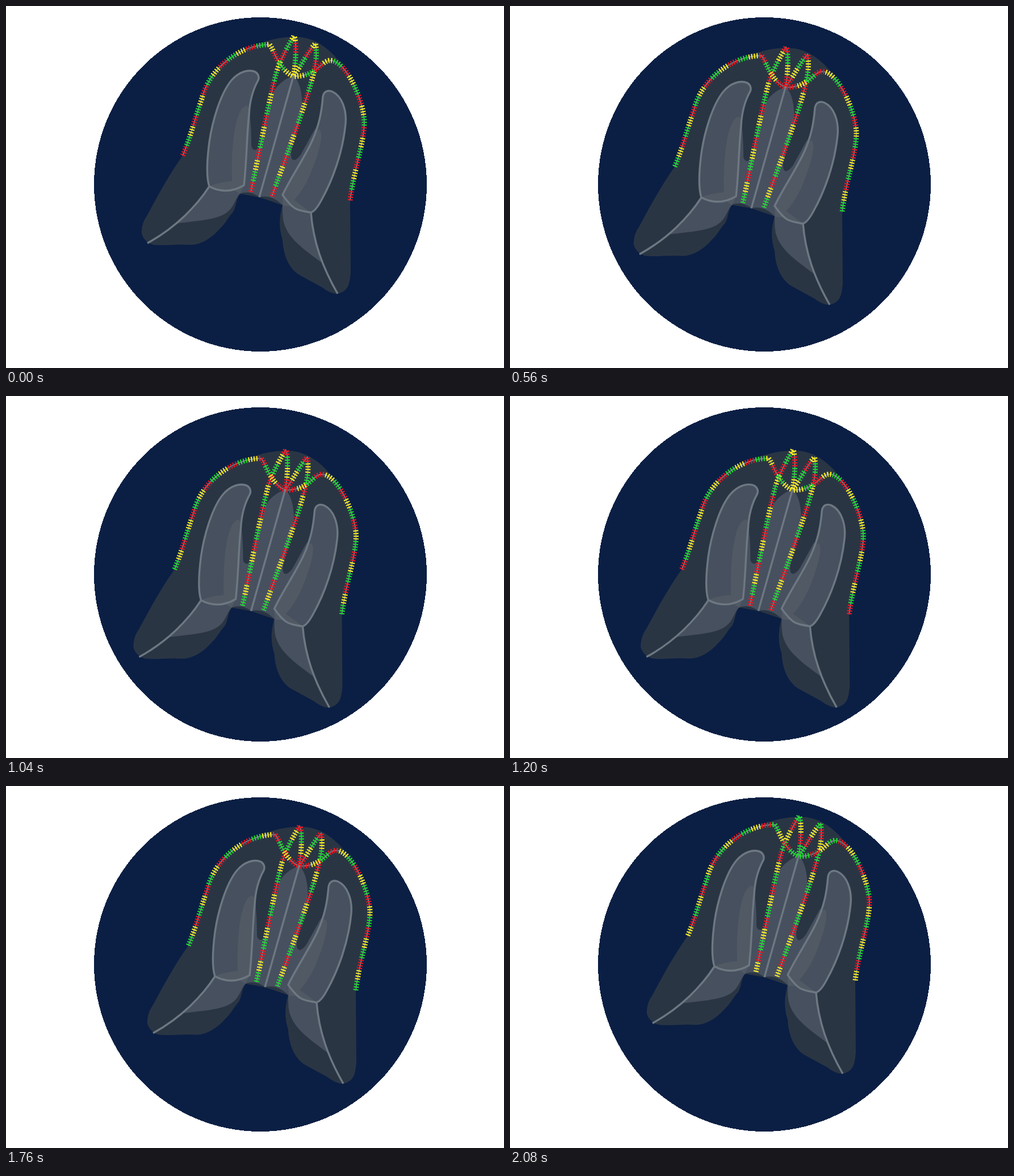
Recreate the animation shown at these times as an HTML page. Size 877 by 638 pixels, loop 2160 ms.

```html
<!DOCTYPE html>
<html lang="en">
<head>
<meta charset="utf-8">
<title>Stitched body</title>
<style>
  html, body { margin: 0; width: 100%; height: 100%; overflow: hidden; background: #fff; }
  svg { display: block; }
  .dark { fill: #2a3544; }
  .light { fill: #47505f; }
  .glow { fill: #515a64; }
  .edge { fill: none; stroke: #6d7882; stroke-width: 3.4; stroke-linejoin: round; }
  .core { fill: none; stroke: #77828a; stroke-width: 2; }
  .tick { fill: none; stroke-width: 9; }
</style>
</head>
<body>
<svg width="877" height="638" viewBox="0 0 877 638">
  <defs>
    <path id="wingL" d="M358 318 C352 300 355 263 358 240 C363 205 377 155 397 131
      C411 115 426 113 434 114.500 C443 116 447 124 444 131 C434 149 429 167 428 192
      C424 225 424 275 419 316 Q388 334 358 318Z"/>
    <path id="wingR" d="M487 333 C500 305 524 270 538 240 C552 210 556 185 558 160
      C560 149 568 148 575 151 C592 159 600 184 598 207 C593 260 574 309 555 343
      C548 356 543 362 537 364 C510 360 505 358 487 333Z"/>
  </defs>
  <ellipse cx="448" cy="314.5" rx="293" ry="294.5" fill="#0b1f44" shape-rendering="crispEdges"/>
  <g id="body">
    <path class="dark" d="M311 264 C319 244 329 212 337 187 C347 150 352 135 374 107 C398 87 430 70 455 63
      C475 56 500 53 520 55 C548 59 573 77 593 106 C612 130 628 165 631 195 C632 225 617 275 606 345
      L607 470 C605 488 604 500 588 506 C579 509 569 505 557 496 L515 473 C496 460 488 435 487 412
      C480 390 481 372 487 351 L446 337 L412 331 C405 340 406 352 400 363 C392 371 386 384 377 392
      C361 410 343 421 325 421 C300 419 280 423 262 421 C248 420 237 405 239 396 C240 384 243 377 248 370
      C268 333 288 296 311 264Z"/>
    <path class="light" d="M506 124 C489 128 474 143 470 155 L447 247 C443 256 433 256 432 246
      C432 225 431 200 428 184 L419 316 L358 318 C342 347 322 368 301 383 C350 377 381 376 396 357
      C403 348 405 338 412 331 C424 326 436 329 446 337 C460 333 475 338 487 351
      C487 365 487 377 491 387 C500 412 526 430 557 453 C545 428 541 395 537 364
      L545 215 L519 262 C508 277 501 273 502 260 C505 237 518 212 521 180 C523 158 517 130 506 124Z"/>
    <use href="#wingL" class="light"/>
    <use href="#wingR" class="light"/>
    <path class="glow" d="M424 176 C406 177 396 237 398 309 C380 310 366 314 358 318 Q388 334 419 316
      C424 275 424 225 428 190 Q428 177 424 176Z"/>
    <path class="glow" d="M552 218 C559 222 554 249 541 283 C530 313 517 332 507 342 L537 364
      C510 360 505 358 487 333 C500 305 524 270 538 240 Q547 217 552 218Z"/>
    <path class="glow" d="M419 316 L412 331 L403 325Z M487 333 L507 353 L488 352Z"/>
    <path class="edge" d="M506 124 L446 337 M358 318 C336 352 300 390 249 418 M537 364 C541 415 557 460 584 507"/>
    <use href="#wingL" class="edge"/>
    <use href="#wingR" class="edge"/>
    <g id="cores"></g>
    <g id="stitches"></g>
  </g>
</svg>
<script>
const FRAME = 80, LOOP = 2160;
const COLORS = ['#f0141e', '#1bdc2b', '#fbee1e'];
const GROUPS = 18, TICKS = 4, TICK_LENGTH = 0.44;

// Each thread runs from its lower end to the shared knot.
const threads = [
  'M431 328 C444 270 460 180 476 118 C484 92 498 68 507 53 C512 60 511 100 506 124',
  'M468 336 C484 291 530 170 542 117 C546 100 548 84 545 66 C532 80 520 105 506 124',
  'M311 264 C325 231 332 200 345 163 C357 112 410 68 464 68 C472 76 478 110 506 124',
  'M606 343 C612 292 631 240 631 205 C631 170 600 96 571 96 C554 96 550 124 506 124'
];

// Key points of the closed drift: time, x, y.
const drift = [
  [0, 0, 0], [240, -10, 4.5], [560, -21, 19.5], [1040, -14.5, 42],
  [1440, 1.5, 35], [1760, 10, 17.5], [2080, 2, 0]
];

function addPath(parent, attrs) {
  const path = document.createElementNS('http://www.w3.org/2000/svg', 'path');
  for (const name in attrs) path.setAttribute(name, attrs[name]);
  document.getElementById(parent).append(path);
  return path;
}

// One group of ticks, then a gap for the two other colours.
const dashes = Array(TICKS).fill([TICK_LENGTH, 1 - TICK_LENGTH]).flat();
dashes[dashes.length - 1] += (COLORS.length - 1) * TICKS;

const stitches = [];
for (const d of threads) {
  addPath('cores', { class: 'core', d });
  COLORS.forEach((_, slot) => stitches.push({
    slot,
    path: addPath('stitches', {
      class: 'tick', d, pathLength: GROUPS * TICKS,
      'stroke-dasharray': dashes.join(' '), 'stroke-dashoffset': -slot * TICKS - 0.1
    })
  }));
}

function keyPoint(i) {
  const n = drift.length, turn = Math.floor(i / n);
  const [t, x, y] = drift[i - turn * n];
  return [t + turn * LOOP, x, y];
}

// Smooth curve through the key points.
function driftAt(time) {
  const i = drift.findLastIndex(([t]) => t <= time);
  const [a, b, c, e] = [-1, 0, 1, 2].map(k => keyPoint(i + k));
  const span = c[0] - b[0], u = (time - b[0]) / span;
  return [1, 2].map(k => {
    const m0 = (c[k] - a[k]) / (c[0] - a[0]) * span;
    const m1 = (e[k] - b[k]) / (e[0] - b[0]) * span;
    const rise = c[k] - b[k];
    return b[k] + m0 * u + (3 * rise - 2 * m0 - m1) * u ** 2 + (m0 + m1 - 2 * rise) * u ** 3;
  });
}

const body = document.getElementById('body');
function draw(time) {
  const step = Math.floor(time % LOOP / FRAME);
  const [x, y] = driftAt(step * FRAME);
  body.setAttribute('transform', `translate(${x.toFixed(2)} ${y.toFixed(2)})`);
  for (const { slot, path } of stitches) {
    path.setAttribute('stroke', COLORS[(slot + step) % COLORS.length]);
  }
}

const start = performance.now();
function tick() {
  draw(performance.now() - start);
  requestAnimationFrame(tick);
}
tick();
</script>
</body>
</html>
```
